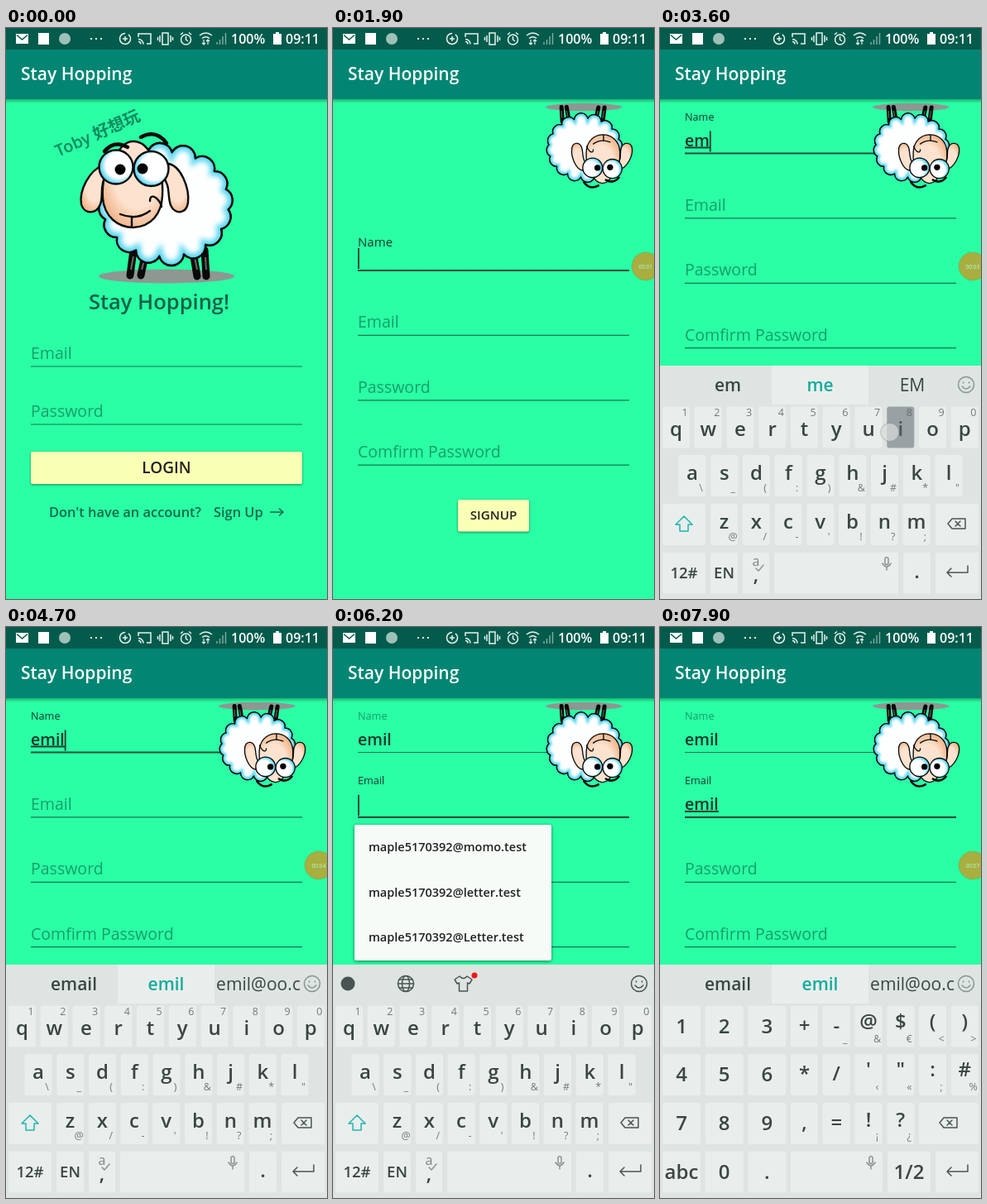
Animation of 388 by 690 pixels, one loop 8 s. Source, as an HTML page:

```html
<!DOCTYPE html>
<html lang="en">
<head>
<meta charset="utf-8">
<title>Sign up demo</title>
<style>
html, body { margin: 0; width: 100%; height: 100%; overflow: hidden; background: #2affa5; }
svg { display: block; width: 100vw; height: 100vh; }
text { font-family: "Open Sans", "Noto Sans", "Noto Sans CJK TC", "Noto Sans CJK SC", sans-serif; }
.semi { font-weight: 600; }
.mid { text-anchor: middle; }
.hint { font-size: 19.5px; fill: #169f68; }
.rule { stroke: #14794f; stroke-width: 1.2; }
.typed { font-size: 19.5px; font-weight: 600; fill: #18352a; }
.button { fill: #f9ffb5; filter: drop-shadow(0 1.5px 1.5px #0007); }
.popup { fill: #f7fbf8; filter: drop-shadow(0 1.5px 2px #0008); }
.item { font-size: 14.5px; font-weight: 600; fill: #222; }
.key { fill: #e9eeec; }
.cap { font-size: 24px; font-weight: 600; fill: #3b4543; text-anchor: middle; }
.cap.small { font-size: 18.5px; }
.alt { font-size: 12.5px; fill: #717a78; text-anchor: middle; }
.icon { fill: none; stroke: #4a5452; stroke-width: 1.5; stroke-linejoin: round; stroke-linecap: round; }
.pale { stroke: #8a9492; }
.status { fill: none; stroke: #e8f3f0; stroke-width: 1.5; }
.ink { stroke: #0a0a0a; stroke-width: 2.4; stroke-linecap: round; stroke-linejoin: round; }
</style>
</head>
<body>
<svg viewBox="0 0 388 690" preserveAspectRatio="none">
  <defs>
    <radialGradient id="skin" cx=".58" cy=".38" r=".65">
      <stop offset=".6" stop-color="#fde3cf"/><stop offset="1" stop-color="#f0b58a"/>
    </radialGradient>
    <radialGradient id="eye" cx=".58" cy=".45" r=".55">
      <stop offset=".68" stop-color="#fff"/><stop offset="1" stop-color="#58d4ee"/>
    </radialGradient>
    <linearGradient id="shade" x2="0" y2="1">
      <stop offset="0" stop-color="#000" stop-opacity=".3"/><stop offset="1" stop-color="#000" stop-opacity="0"/>
    </linearGradient>
    <filter id="soft"><feGaussianBlur stdDeviation="3"/></filter>
    <clipPath id="woolClip"><path class="wool"/></clipPath>
  </defs>
  <rect width="388" height="690" fill="#2affa5"/>

  <g id="login">
    <text transform="translate(63 156) rotate(-24)" class="semi" font-size="20" fill="#128a60">Toby 好想玩</text>
    <text x="185" y="340" class="semi mid" font-size="25.5" fill="#106146">Stay Hopping!</text>
    <text x="30" y="400" class="hint">Email</text>
    <path class="rule" d="M30 409H358M30 479H358"/>
    <text x="30" y="470" class="hint">Password</text>
    <rect class="button" x="30" y="512" width="328" height="39" rx="2"/>
    <text x="194" y="538" class="semi mid" font-size="19" fill="#222">LOGIN</text>
    <g fill="#10694a" class="semi" font-size="16.4">
      <text x="52" y="591">Don't have an account?</text>
      <text x="251" y="591">Sign Up</text>
    </g>
    <path d="M319 585H335M330 580.5L335 585L330 589.5" fill="none" stroke="#10694a" stroke-width="1.5"/>
  </g>

  <g id="signup">
    <g id="fields"></g>
    <rect class="button" x="151" y="570" width="86" height="38.5" rx="2"/>
    <text x="194" y="594" class="semi mid" font-size="15.2" fill="#222">SIGNUP</text>
  </g>

  <g id="sheep">
    <ellipse cx="194" cy="300" rx="82" ry="8.5" fill="#8f9792"/>
    <path d="M154 268L150 299M169 270L163 299M226 270L231 300M240 268L242 300" stroke="#0a0a0a" stroke-width="9" stroke-linecap="round"/>
    <path d="M154 276L151 292M168 277L164 292M228 277L231 292M241 277L242 292" stroke="#666" stroke-width="2"/>
    <path class="wool ink" fill="#fdffff"/>
    <g clip-path="url(#woolClip)">
      <path class="wool" fill="none" stroke="#35cdea" stroke-width="11" filter="url(#soft)" opacity=".85"/>
    </g>
    <path class="wool ink" fill="none"/>
    <g class="ink" fill="url(#skin)">
      <path d="M117 166C101 172 88 196 91 213C94 225 109 226 114 213C118 203 113 190 120 180Z"/>
      <path d="M196 164C211 166 222 193 220 211C218 225 204 226 199 214C195 204 199 191 190 180Z"/>
      <path d="M155 137C143 136 137 147 130 158C118 172 116 190 117 206C119 228 135 241 154 241C176 240 188 224 189 203C190 186 187 168 178 156C171 146 167 138 155 137Z"/>
      <path fill="none" d="M138 225Q158 233 174 221M152 228V239M174 209Q174 201 181 205Q187 210 188 216"/>
    </g>
    <g class="ink" fill="url(#eye)">
      <circle cx="133" cy="168" r="20.5"/><circle cx="175.500" cy="170" r="21"/>
    </g>
    <circle cx="138" cy="171" r="6.5"/><circle cx="165" cy="170" r="6.5"/>
    <path d="M119 149Q131 135 147 144M163 132Q181 122 194 139" fill="none" stroke="#0a0a0a" stroke-width="4.5" stroke-linecap="round"/>
  </g>

  <rect y="86" width="388" height="5" fill="url(#shade)"/>
  <rect y="26" width="388" height="60" fill="#038573"/>
  <rect width="388" height="26" fill="#035b4c"/>
  <text x="18" y="63" class="semi" font-size="21" fill="#f4fffb">Stay Hopping</text>
  <g id="bar" class="status">
    <rect x="12" y="7" width="15" height="12" fill="#fff" stroke="none"/>
    <path d="M13 8.500L19.500 14L26 8.500" stroke="#035b4c"/>
    <rect x="39" y="6" width="13" height="14" fill="#fff" stroke="none"/>
    <circle cx="71" cy="13" r="7" fill="#9fc0b8" stroke="none"/>
    <path d="M102 13H116" stroke-width="2" stroke-dasharray="2 4"/>
    <circle cx="144" cy="13" r="6.500" stroke-dasharray="30 4"/><path d="M144 10V16M141 13H147"/>
    <path d="M160 11V7H175V19H170M160 13.500A6 6 0 0 1 166 19.500M160 16.500A3 3 0 0 1 163 19.500"/>
    <path d="M189 6H196V20H189ZM186 9V17M199 9V17M183.500 11V15M201.500 11V15"/>
    <circle cx="217.500" cy="14" r="6"/><path d="M217.500 10V14L220 16M211 8L214 5.500M224 8L221 5.500"/>
    <path d="M234 9Q241.500 3 249 9M237 12.500Q241.500 9 246 12.500"/><path d="M239 14V20M237 18L239 20L241 18M244 20V14M242 16L244 14L246 16" stroke-width="1.200"/>
    <path d="M255 20V17M258.500 20V14M262 20V10M265.500 20V6" stroke="#7ea89f"/>
    <path d="M323 7H326V5H330V7H333V20H323Z" fill="#fff" stroke="none"/>
    <g fill="#fff" stroke="none" font-size="16" class="semi"><text x="272" y="18.500">100%</text><text x="338" y="18.500">09:11</text></g>
  </g>

  <g id="namePopup">
    <rect class="popup" x="26" y="161" width="118" height="54" rx="2"/>
    <text x="43" y="192" class="item">Bird517340</text>
  </g>
  <g id="mailPopup">
    <rect class="popup" x="26" y="239" width="238" height="164" rx="2"/>
    <text x="43" y="271" class="item">maple5170392@momo.test</text>
    <text x="43" y="326" class="item">maple5170392@letter.test</text>
    <text x="43" y="380" class="item">maple5170392@Letter.test</text>
  </g>

  <g id="keyboard">
    <rect y="408" width="388" height="282" fill="#dee4e1"/>
    <g id="tools">
      <circle cx="18" cy="431" r="8.500" fill="#4a5452"/>
      <g class="icon">
        <circle cx="88" cy="431" r="9.500"/><ellipse cx="88" cy="431" rx="4.500" ry="9.500"/>
        <path d="M78.500 431H97.500M80 426H96M80 436H96"/>
        <path d="M153 422Q157.500 427 162 422L168 426L165 431L162.500 430V440H152.500V430L150 431L147 426Z"/>
      </g>
      <circle cx="171" cy="421" r="3.500" fill="#f01818"/>
    </g>
    <g id="words">
      <rect x="135" y="408" width="117" height="47" fill="#e9eeec"/>
      <g class="semi mid" font-size="21" fill="#3b4543">
        <text x="82" y="439"></text><text x="193.500" y="439" fill="#12ab9c"></text><text x="305" y="439" font-weight="400"></text>
      </g>
    </g>
    <g id="smile" class="icon">
      <circle cx="370" cy="431" r="9.500"/><path d="M365 433Q370 439 375 433M366.500 428V429M373.500 428V429"/>
    </g>
    <g id="letters"></g>
    <g id="symbols"></g>
    <rect id="press" height="50" rx="3" fill="#59636a" opacity=".55"/>
  </g>

  <g id="bubble">
    <circle cy="288" fill="#f57c00" stroke="#0002"/>
    <text y="291" class="mid" fill="#fff"></text>
  </g>
  <circle id="touch" r="11" fill="#d8dcdc" fill-opacity=".7" stroke="#8888" />
</svg>
<script>
const LOOP = 8000, NAME = 'emil';
const $ = id => document.getElementById(id);
const set = (node, attrs) => { for (const k in attrs) node.setAttribute(k, attrs[k]); };
const show = (node, on) => set(node, { visibility: on ? 'visible' : 'hidden' });
const clamp = x => Math.min(1, Math.max(0, x));
const ease = (t, a, b) => { const x = clamp((t - a) / (b - a)); return x * x * (3 - 2 * x); };
const mix = (a, b, k) => a + (b - a) * k;
const within = (t, a, b) => t >= a && t < b;

// Scalloped fleece outline
function woolPath() {
  const n = 16, at = i => {
    const a = i * 2 * Math.PI / n + .1;
    return `${(193 + 76 * Math.cos(a)).toFixed(1)} ${(213 + 63 * Math.sin(a)).toFixed(1)}`;
  };
  let d = 'M' + at(0);
  for (let i = 1; i <= n; i++) d += `A15 15 0 0 1 ${at(i)}`;
  return d + 'Z';
}
document.querySelectorAll('.wool').forEach(p => set(p, { d: woolPath() }));

// Form fields
$('fields').innerHTML = ['Name', 'Email', 'Password', 'Comfirm Password'].map((label, i) => {
  const y = 293 + 78.4 * i;
  return `<g><text class="hint" x="30" y="${y - 9}">${label}</text>
    <path class="rule" d="M30 ${y}H358"/>
    <text class="typed" x="30" y="${y - 9}"></text>
    <rect y="${y - 27}" width="1.8" height="25" fill="#173c2f"/></g>`;
}).join('');
const fields = [...$('fields').children].map(g => {
  const [label, rule, typed, caret] = g.children;
  return { label, rule, typed, caret, base: +label.getAttribute('y') };
});

// Keyboard
const ROWS = [457.5, 516, 575, 633.5], PITCH = 38.75;
const keys = {};
function key(row, x, w, label = '', alt = '', cls = '', rise = 31) {
  const y = ROWS[row], top = row === 0 && /\d/.test(alt);
  keys[label] = { x, y, width: w };
  return `<rect class="key" x="${x}" y="${y}" width="${w}" height="50" rx="3"/>
    <text class="cap ${cls}" x="${x + w / 2}" y="${y + rise}">${label}</text>
    <text class="alt" x="${x + w - 6}" y="${y + (top ? 11.5 : 44)}">${alt}</text>`;
}
const run = (row, x, labels, alts, rise) =>
  [...labels].map((c, i) => key(row, x + PITCH * i, 33, c, alts[i] === ' ' ? '' : alts[i], '', rise)).join('');
const icon = (d, cls = '') => `<path class="icon ${cls}" d="${d}"/>`;
const erase = x => icon(`M${x - 11} 599l5-6h16v12h-16zM${x - 2} 596l6 6m0-6l-6 6`);
const enter = icon('M372 650V658H347M352 653L347 658L352 663');
const mic = (x, y) => icon(`M${x - 2} ${y - 6}q2-3 4 0v6q-2 3-4 0zM${x - 5} ${y}q5 8 10 0M${x} ${y + 4}v4`, 'pale');

$('letters').innerHTML =
  run(0, 3, 'qwertyuiop', '1234567890', 35) +
  run(1, 22.5, 'asdfghjkl', '\\_(:)&#*"', 30) +
  key(2, 3, 52) + run(2, 61, 'zxcvbnm', "@/-'!?;", 30) + key(2, 333, 52) +
  key(3, 3, 52, '12#', '', 'small') + key(3, 61, 33, 'EN', '', 'small') +
  key(3, 100, 32, ',', '', '', 35) + key(3, 138, 150) + key(3, 294, 33, '.') + key(3, 333, 52) +
  '<path class="icon" style="stroke:#1fb5ad" d="M29 590L39 600H34V608H24V600H19Z"/>' +
  '<text class="cap" style="font-size:16px;fill:#7b8583;font-weight:400" x="116" y="650">a</text>' +
  icon('M116 653l3 3l6-7', 'pale') + mic(274, 647) + erase(359) + enter;

const digits = (row, labels) => [...labels].map((c, i) => key(row, 3 + 51.7 * i, 46, c, '', '', 33)).join('');
$('symbols').innerHTML =
  digits(0, '123') + run(0, 158, '+-', ' _', 32) + run(0, 235.5, '@$()', '&€<>', 27) +
  digits(1, '456') + run(1, 158, '*/', '  ', 32) + run(1, 235.5, '\'":#', '‹«;%', 27) +
  digits(2, '789') + run(2, 158, ',=', '  ', 32) + run(2, 235.5, '!?', '¡¿', 29) + key(2, 313, 72) +
  key(3, 3, 46, 'abc', '', '', 33) + digits(3, ' 0.').replace(/^.*/, '') +
  key(3, 158, 111) + key(3, 275, 52, '1/2', '', '', 33) + key(3, 333, 52) +
  mic(255, 647) + erase(349) + enter;

// Timeline: [down, up, target], target is a key label or a point
const FOCUS = [1780, 5180];
const strokes = [[[2900, 3050], [3300, 3420], [3540, 3700], [4100, 4250]],
                 [[6430, 6550], [6640, 6750], [6840, 6950], [7040, 7150]]];
const SWITCH = 7560;
const taps = [[230, 400, [288, 586]], [1620, 1780, [190, 281]], [5050, 5180, [170, 215]], [7420, SWITCH, '12#']];
strokes.forEach(word => word.forEach(([a, b], i) => taps.push([a, b, NAME[i]])));
const WORDS = [[], ['e', 'we', 'E'], ['em', 'me', 'EM'], ['emi', 'emit', 'emu'], ['email', NAME, NAME + '@oo.c']];

function drawFields(t, focus) {
  set($('signup'), { transform: `translate(0 ${-141.5 * ease(t, 1900, 2040)})` });
  fields.forEach((f, i) => {
    const on = i === focus, start = FOCUS[i] ?? Infinity;
    const lift = i < 2 ? ease(t, start, start + 200) : 0;
    const done = (strokes[i] || []).filter(s => t >= s[1]);
    set(f.label, {
      y: f.base - 30.500 * lift,
      style: `font-size:${mix(19.5, 12.7, lift)}px;fill:${on ? '#17382c' : '#169f68'}`
    });
    set(f.rule, { style: on ? 'stroke:#1c4f3c;stroke-width:2.2' : '' });
    f.typed.textContent = NAME.slice(0, done.length);
    set(f.typed, { 'text-decoration': on ? 'underline' : 'none' });
    const last = done.length ? done[done.length - 1][1] : start;
    const x = 30 + (done.length ? f.typed.getComputedTextLength() : 0);
    set(f.caret, { x });
    show(f.caret, on && Math.floor((t - last) / 500) % 2 === 0);
  });
}

function drawKeyboard(t, focus) {
  const up = ease(t, 1900, 2040);
  set($('keyboard'), { transform: `translate(0 ${282 * (1 - up)})` });
  const count = focus < 0 ? 0 : strokes[focus].filter(s => t >= s[1]).length;
  show($('tools'), !count);
  show($('words'), count);
  set($('smile'), { class: count ? 'icon pale' : 'icon' });
  $('words').querySelectorAll('text').forEach((n, i) => n.textContent = WORDS[count][i] || '');
  show($('letters'), t < SWITCH);
  show($('symbols'), t >= SWITCH);
}

function drawTouch(t) {
  const tap = taps.find(([a, b]) => within(t, a, b));
  const k = tap && keys[tap[2]];
  show($('touch'), tap);
  show($('press'), k);
  if (k) set($('press'), k);
  if (tap) {
    const [cx, cy] = k ? [k.x + k.width / 2 - 13, k.y + 31] : tap[2];
    set($('touch'), { cx, cy });
  }
}

function drawBubble(t) {
  const dock = ease(t, 1550, 1750);
  const [disc, label] = $('bubble').children;
  const x = mix(364, 378, dock);
  show($('bubble'), within(t, 700, 1950) || within(t, 3050, 5300) || t >= 6550);
  set($('bubble'), { opacity: mix(1, .62, dock) });
  set(disc, { cx: x, r: mix(21.5, 17, dock) });
  set(label, { x, 'font-size': mix(8.2, 6.6, dock) });
  label.textContent = '00:0' + Math.max(0, Math.floor((t - 550) / 1000));
}

function draw(t) {
  const focus = t < FOCUS[0] ? -1 : t < FOCUS[1] ? 0 : 1;
  const move = ease(t, 450, 850);
  set($('login'), { opacity: 1 - ease(t, 430, 620) });
  set($('signup'), { opacity: ease(t, 550, 800) });
  set($('sheep'), {
    transform: `translate(${mix(183, 309.5, move)} ${mix(217, 142.4, move)}) rotate(${180 * move}) scale(${mix(1, .5645, move)}) translate(-183 -217)`
  });
  set($('namePopup'), { opacity: t < 3050 ? ease(t, 2120, 2240) : 0 });
  set($('mailPopup'), { opacity: t < 6550 ? ease(t, 5400, 5520) : 0 });
  drawFields(t, focus);
  drawKeyboard(t, focus);
  drawTouch(t);
  drawBubble(t);
}

const begin = performance.now();
function tick() {
  draw((performance.now() - begin) % LOOP);
  requestAnimationFrame(tick);
}
tick();
</script>
</body>
</html>
```
